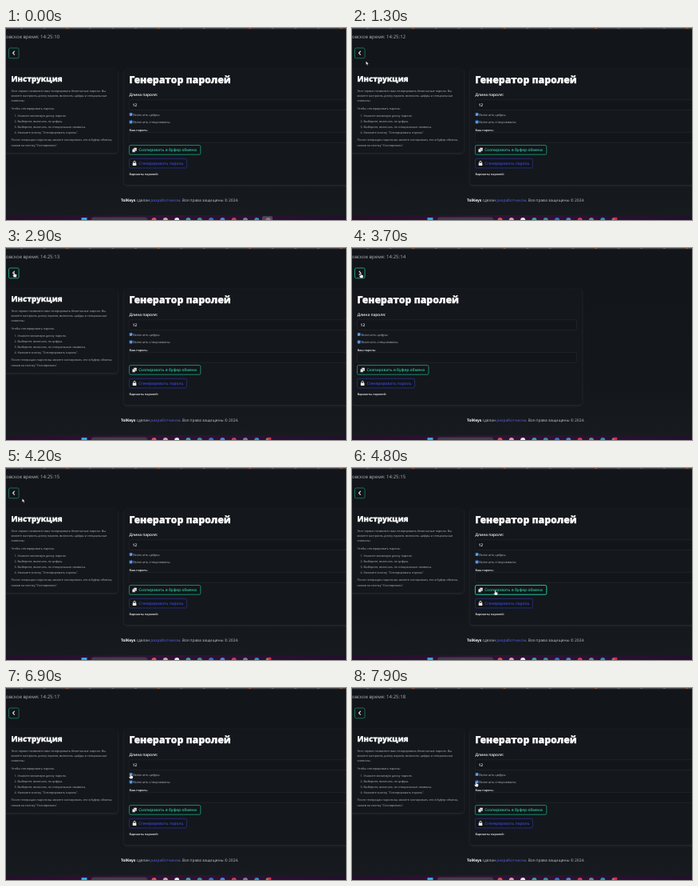
Recreate the animation shown at these times as an HTML page. Size 426 by 240 pixels, loop 8 s.

```html
<!DOCTYPE html>
<html lang="ru">
<head>
<meta charset="utf-8">
<title>Генератор паролей</title>
<style>
  html, body { margin: 0; width: 100%; height: 100%; overflow: hidden; background: #121519; }
  svg { display: block; width: 100vw; height: 100vh; }
  text { font-family: 'Open Sans', 'Noto Sans', sans-serif; fill: #b2b4b8; text-rendering: geometricPrecision; white-space: pre; }
  .h { font-weight: 800; fill: #fff; stroke: #fff; stroke-width: .3; }
  .b { font-weight: 600; fill: #f4f5f6; }
  .card { fill: #14171c; filter: drop-shadow(0 1px 1.5px #2b2f35); }
  .field { fill: #121519; stroke: #24282d; stroke-width: .7; }
  .btn { fill: #121519; stroke-width: .9; }
</style>
</head>
<body>
<svg viewBox="0 0 426 240" preserveAspectRatio="none">
  <defs>
    <linearGradient id="bar">
      <stop offset="0" stop-color="#241029"/>
      <stop offset=".45" stop-color="#321238"/>
      <stop offset="1" stop-color="#22102c"/>
    </linearGradient>
    <linearGradient id="page" x2="0" y2="1">
      <stop offset="0" stop-color="#121519"/>
      <stop offset=".7" stop-color="#13161a"/>
      <stop offset="1" stop-color="#171b1f"/>
    </linearGradient>
  </defs>
  <rect width="426" height="240" fill="url(#page)"/>
  <rect width="426" height="1.3" fill="#47494d"/>
  <g id="tabs"></g>
  <text id="clock" x="0" y="13.2" font-size="6.05" fill="#b8babd"></text>

  <rect id="back" class="btn" x="3.5" y="25" width="12.6" height="12.8" rx="1.8"/>
  <path id="chevron" fill="none" stroke="#eee" stroke-width="1.1"/>

  <g id="guide">
    <rect class="card" x="-5" y="51" width="145" height="105" rx="4"/>
    <text class="h" x="6.5" y="66.6" font-size="9.6">Инструкция</text>
  </g>

  <g id="panel">
    <rect class="card" x="148" y="51" width="288" height="145" rx="4"/>
    <text class="h" x="154.3" y="69" font-size="12.25">Генератор паролей</text>
    <text class="b" x="154.5" y="84.8" font-size="4.8">Длина пароля:</text>
    <rect class="field" x="154.3" y="89.7" width="275" height="12.8" rx="1.6"/>
    <text class="b" x="158.4" y="98" font-size="4.9">12</text>
    <g id="checks"></g>
    <text class="b" x="154.5" y="129" font-size="3.65">Ваш пароль:</text>
    <rect class="field" x="154.3" y="130.5" width="275" height="12.8" rx="1.6"/>
    <rect id="copy" class="btn" x="154.4" y="146.6" width="89.4" height="11.6" rx="1.6"/>
    <g fill="#f4f4f4">
      <rect x="160" y="149.7" width="3.6" height="4" rx=".5"/>
      <rect x="158.2" y="151.2" width="3.6" height="4" rx=".5" stroke="#14171b" stroke-width=".4"/>
    </g>
    <text x="166.2" y="154.2" font-size="4.86" font-weight="600" style="fill:#2cc79c">Скопировать в буфер обмена</text>
    <rect id="make" class="btn" x="154.4" y="163.4" width="72" height="11.6" rx="1.6"/>
    <rect x="158.7" y="168.5" width="4.6" height="3.6" rx=".6" fill="#f4f4f4"/>
    <path d="M159.7 168.7v-1a1.3 1.3 0 0 1 2.6 0v1" fill="none" stroke="#f4f4f4" stroke-width=".8"/>
    <text x="166.2" y="171" font-size="4.84" font-weight="600" style="fill:#3a46d8">Сгенерировать пароль</text>
    <text class="b" x="154.5" y="183.9" font-size="3.65">Варианты паролей:</text>
  </g>

  <text x="217.8" y="216.9" font-size="4.9" text-anchor="middle" style="fill:#c4c6c9"><tspan font-weight="700" fill="#fff">TolKeys</tspan> сделан <tspan fill="#5b60f2">разработчиком</tspan>. Все права защищены © 2024.</text>

  <rect y="234" width="426" height="6" fill="url(#bar)"/>
  <g id="tray"></g>
  <g id="pointer">
    <path id="arrow" d="M0 0V4.6L1.1 3.6 1.9 5.3 2.7 4.9 1.9 3.3H3.3Z" fill="#fff" stroke="#111" stroke-width=".3"/>
    <path id="hand" d="M-.6 0Q0-.6.6 0V2.1L2.6 2.5Q3.3 2.8 3.1 4L2.6 6H-.5L-2.1 3.6Q-1.9 2.8-.6 3.5Z" fill="#fff" stroke="#111" stroke-width=".3"/>
  </g>
</svg>
<script>
const LOOP = 8000, STEP = 100;
const $ = id => document.getElementById(id);

function add(parent, tag, attrs, label) {
  const el = document.createElementNS('http://www.w3.org/2000/svg', tag);
  for (const key in attrs) el.setAttribute(key, attrs[key]);
  if (label) el.textContent = label;
  return $(parent).appendChild(el);
}

// Guide lines: left edge, baseline, text
[
  [6.5, 80.2, 'Этот сервис позволяет вам генерировать безопасные пароли. Вы'],
  [6.5, 86.2, 'можете настроить длину пароля, включить цифры и специальные'],
  [6.5, 92.1, 'символы.'],
  [6.5, 101.5, 'Чтобы сгенерировать пароль:'],
  [10.4, 111.2, '1. Укажите желаемую длину пароля.'],
  [10.4, 118, '2. Выберите, включать ли цифры.'],
  [10.4, 124.9, '3. Выберите, включать ли специальные символы.'],
  [10.4, 131.7, '4. Нажмите кнопку "Сгенерировать пароль".'],
  [6.5, 141.2, 'После генерации пароля вы можете скопировать его в буфер обмена,'],
  [6.5, 147.8, 'нажав на кнопку "Скопировать".']
].forEach(([x, y, s]) => add('guide', 'text', { x, y, 'font-size': 3.69 }, s));

[[108, 'Включить цифры'], [117.5, 'Включить спецсимволы']].forEach(([y, s]) => {
  add('checks', 'rect', { x: 154.6, y: y - 1.9, width: 3.8, height: 3.8, rx: .7, fill: '#3b82dc' });
  add('checks', 'path', { d: `M155.5 ${y}l.8.8 1.4-1.7`, fill: 'none', stroke: '#fff', 'stroke-width': .5 });
  add('checks', 'text', { x: 159.3, y: y + 1.5, 'font-size': 3.93 }, s);
});

for (let i = 0; i < 15; i++)
  add('tabs', 'rect', { x: 18 + i * 28.6, y: 0, width: 3, height: 1, fill: i % 4 == 2 ? '#a8563c' : '#6a6c70' });

add('tray', 'rect', { x: 94.5, y: 237, width: 7, height: 4, fill: '#35a5e5' });
add('tray', 'rect', { x: 107, y: 236.6, width: 70, height: 8, rx: 3, fill: '#443a48' });
const glow = add('tray', 'rect', { x: 321, y: 235.3, width: 13, height: 6, rx: 1.5, fill: '#54445a' });
['#d9534f', '#d8a5a0', '#e8e8ea', '#35a8a0', '#3c8f9c', '#3d6fd0', '#4a86d8', '#c8404a', '#77808c', '#2f8fc0', '#8d7880']
  .forEach((fill, i) => add('tray', 'circle', { cx: 185.5 + i * 14.3, cy: 240, r: 3, fill }));
const badge = add('tray', 'circle', { cx: 330.5, cy: 238.3, r: 1.9, fill: '#e02a35' });

// Pointer stops: time, x, y
const path = [
  [0, 328, 243], [200, 328, 243], [900, 28, 52], [1300, 17.5, 41.5], [1800, 10, 30.5],
  [2900, 10.3, 30.5], [3700, 11, 31.5], [4100, 11, 31.5], [4800, 179.5, 153],
  [5200, 181, 155], [5600, 183, 169.5], [6200, 183, 169.5], [6700, 156, 107.5],
  [7100, 156, 107.5], [7500, 155.3, 117.5], [8000, 155.3, 117.5]
];

function pointerAt(t) {
  const i = path.findIndex(p => p[0] > t);
  const [t0, x0, y0] = path[i - 1], [t1, x1, y1] = path[i];
  const k = (t - t0) / (t1 - t0), e = k * k * (3 - 2 * k);
  return [x0 + (x1 - x0) * e, y0 + (y1 - y0) * e];
}

function draw(t) {
  const open = t < 3100 || t >= 4000;
  const [x, y] = pointerAt(t);
  const over = (l, top, r, bottom) => x >= l && x <= r && y >= top && y <= bottom;
  const onBack = over(3, 25, 17, 38);
  const onCopy = open && over(154, 146, 244, 158.5);
  const onMake = open && over(154, 163, 227, 175.5);
  const onCheck = open && over(154, 105.5, 159, 120);

  $('clock').textContent = 'овское время: 14:25:' + (10 + Math.floor((t + 900) / 1000));
  $('guide').style.display = open ? '' : 'none';
  $('panel').setAttribute('transform', `translate(${open ? 0 : -147.8} 0)`);
  $('chevron').setAttribute('d', open ? 'M10.8 28.9l-2.2 2.4 2.2 2.4' : 'M8.8 28.9l2.2 2.4-2.2 2.4');
  $('back').setAttribute('stroke', onBack ? '#25a586' : '#1a7561');
  $('copy').setAttribute('stroke', onCopy ? '#27d9a8' : '#1d9674');
  $('make').setAttribute('stroke', onMake ? '#3b46cf' : '#292f78');

  const hand = onBack || onCopy || onMake || onCheck;
  $('hand').style.display = hand ? '' : 'none';
  $('arrow').style.display = hand ? 'none' : '';
  $('pointer').setAttribute('transform', `translate(${x.toFixed(2)} ${y.toFixed(2)})`);
  glow.style.display = t < 300 ? '' : 'none';
  badge.style.display = t < 300 ? 'none' : '';
}

const start = performance.now();
function tick() {
  const t = Math.max(0, performance.now() - start) % LOOP;
  draw(Math.floor(t / STEP) * STEP);
  requestAnimationFrame(tick);
}
tick();
</script>
</body>
</html>
```
